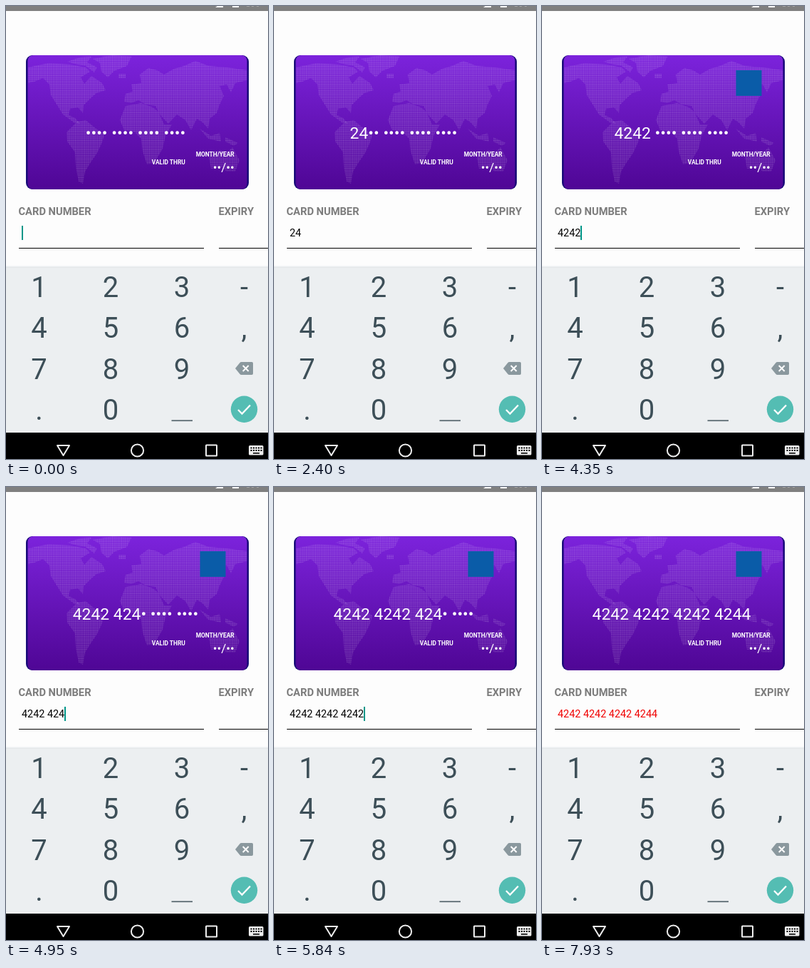
Recreate the animation shown at these times as an HTML page. Size 368 by 635 pixels, loop 8000 ms.

```html
<!DOCTYPE html>
<html lang="en">
<head>
<meta charset="utf-8">
<title>Card number form</title>
<style>
  html, body { margin: 0; width: 100%; height: 100%; overflow: hidden; background: #fdfdfd; }
  svg { display: block; width: 368px; height: 635px; font-family: Roboto, sans-serif; }
  .label { font-size: 14.7px; font-weight: 700; fill: #7c7c7c; }
  .small { font-size: 8.4px; font-weight: 700; fill: #fff; }
  .number { font-size: 22.9px; fill: #fff; text-anchor: middle; }
  .field { font-size: 14.4px; }
  .keys { font-size: 40px; fill: #3d4f58; text-anchor: middle; }
  .nav { fill: none; stroke: #eee; stroke-width: 2; }
</style>
</head>
<body>
<svg viewBox="0 0 368 635">
  <defs>
    <linearGradient id="purple" x2="0" y2="1">
      <stop offset="0" stop-color="#7c23dc"/>
      <stop offset="1" stop-color="#4f0695"/>
    </linearGradient>
    <pattern id="dots" width="2.6" height="2.6" patternUnits="userSpaceOnUse">
      <circle cx="1.3" cy="1.3" r=".95" fill="#fff" fill-opacity=".23"/>
    </pattern>
    <clipPath id="face"><rect x="30.5" y="69" width="308" height="188" rx="8"/></clipPath>
  </defs>

  <!-- status bar -->
  <rect width="368" height="7" fill="#808080"/>
  <path d="M294 2L297 0H305V2ZM318 0H327V2H318Z" fill="#fff"/>
  <path d="M338 .5H342M345 .5H348M352 .5H355" stroke="#a4a4a4"/>

  <!-- card -->
  <rect x="28" y="69" width="313" height="188" rx="9" fill="#180b78"/>
  <g clip-path="url(#face)">
    <rect x="30" y="69" width="309" height="188" fill="url(#purple)"/>
    <g fill="url(#dots)">
      <path d="M31 86L60 80 90 82 112 86 118 92 105 100 110 109 120 98 135 108 140 118 127 122 118 130 109 139 108 150 101 142 90 144 88 153 97 157 104 165 95 163 80 152 70 136 63 125 61 110 52 101 40 106 31 108Z"/>
      <path d="M86 78L104 72 120 71 114 79 128 86 124 93 112 84 96 81Z"/>
      <path d="M122 74L150 69 176 71 170 84 152 91 143 100 134 92 132 80Z"/>
      <path d="M100 162L112 160 124 170 138 180 135 191 128 206 119 219 111 232 108 249 102 246 98 225 97 205 86 190 85 177Z"/>
      <path d="M166 134L168 123 178 120 176 110 190 108 188 96 200 87 212 90 222 96 236 88 250 84 266 77 285 84 310 86 339 90V104L322 108 316 121 310 110 300 112 306 126 300 138 296 150 286 158 284 172 276 163 268 158 260 174 252 160 240 152 228 165 216 152 210 140 196 138 186 132 176 136Z"/>
      <path d="M168 140L190 136 206 142 214 148 222 166 233 166 224 182 220 200 208 220 198 222 192 204 190 186 180 176 166 174 160 160Z"/>
      <path d="M285 212L300 202 312 204 318 198 328 216 322 232 310 232 302 226 288 228ZM272 172L284 186 302 190 300 178 288 182ZM308 184L326 192 320 196 308 190ZM158 95H168V101H158Z"/>
    </g>
  </g>
  <rect id="brand" x="272.5" y="90" width="36" height="36" fill="#0a5ca8"/>
  <text id="number" class="number" x="182" y="185.7"></text>
  <text class="small" x="204.8" y="222">VALID THRU</text>
  <text class="small" x="320.7" y="211" text-anchor="end">MONTH/YEAR</text>
  <text x="320.7" y="231.5" font-size="17" fill="#fff" text-anchor="end">••/••</text>

  <!-- form -->
  <text class="label" x="17.5" y="293.3">CARD NUMBER</text>
  <text class="label" x="298.5" y="293.3">EXPIRY</text>
  <path d="M18 339.5H278M299 339.5H368" stroke="#000"/>
  <text id="field" class="field" x="22" y="323.2"></text>
  <rect id="caret" y="308" width="2" height="20" fill="#009688"/>

  <!-- keyboard -->
  <rect y="364" width="368" height="234" fill="#eceff1"/>
  <path d="M0 364.5H368" stroke="#f4f6f7"/>
  <path d="M0 366.5H368" stroke="#e4e7e9"/>
  <g id="keys" class="keys"></g>
  <path d="M232.5 581.2H262" stroke="#5c6b73" stroke-width="1.8"/>
  <path d="M322 508L328.5 500Q329.3 499 330.5 499H345.3Q347 499 347 500.7V515.3Q347 517 345.3 517H330.5Q329.3 517 328.5 516Z" fill="#8a989e"/>
  <path d="M332.7 504L340.7 512M340.7 504L332.7 512" stroke="#fff" stroke-width="2"/>
  <circle cx="334.5" cy="565.3" r="18.7" fill="#54bdb3"/>
  <path d="M326 566L331.5 571.5 343 559.5" fill="none" stroke="#fff" stroke-width="2.3"/>

  <!-- navigation bar -->
  <rect y="598" width="368" height="37" fill="#000"/>
  <g class="nav">
    <path d="M72 616H89L80.5 630Z" stroke-linejoin="round"/>
    <circle cx="184.5" cy="623" r="8.6"/>
    <rect x="281" y="615.5" width="15" height="15" rx=".5"/>
  </g>
  <rect x="341" y="616" width="20.5" height="13.5" rx="1.5" fill="#eee"/>
  <path d="M343.5 619.5H359.5M343.5 623H359.5" stroke="#000" stroke-width="2" stroke-dasharray="2 1.5"/>
  <path d="M347 626.8H356" stroke="#000" stroke-width="1.6"/>
</svg>
<script>
  const LOOP = 8000;
  const PAN = '4242424242424244';
  const $ = id => document.getElementById(id);
  const pan = n => PAN.slice(0, n);
  const group = s => s.replace(/(.{4})(?=.)/g, '$1 ');

  const columns = [46.5, 147, 247, 334.5];
  ['123-', '456,', '789', '.0'].forEach((row, r) => [...row].forEach((char, c) => {
    const key = document.createElementNS('http://www.w3.org/2000/svg', 'text');
    key.setAttribute('x', columns[c]);
    key.setAttribute('y', 407.7 + r * 57.4);
    key.textContent = char;
    $('keys').append(key);
  }));

  // [start ms, typed digits, caret visible, digits on the card if it lags behind]
  const steps = [
    [0, '', 1], [450, '', 0], [900, '', 1], [1350, '', 0],
    [1500, '2', 1], [1800, '24', 1], [2400, '24', 0], [2550, '2', 1],
    [2850, '', 1], [3300, '', 0],
    [3450, pan(1), 1], [3750, pan(2), 1], [3900, pan(3), 1, pan(2)], [4050, pan(3), 1],
    [4200, pan(4), 1, pan(3)], [4350, pan(4), 1], [4500, pan(5), 1],
    [4650, pan(6), 1, pan(5)], [4800, pan(6), 1], [4950, pan(7), 1],
    [5100, pan(8), 1], [5250, pan(9), 1], [5400, pan(10), 1],
    [5540, pan(11), 1, pan(10)], [5690, pan(11), 1],
    [5840, pan(12), 1, pan(11)], [5990, pan(12), 1],
    [6290, pan(13), 1], [6430, pan(14), 1], [7030, pan(15), 1],
    [7330, PAN, 1], [7930, PAN, 0]
  ];

  // Roboto advance widths in em
  const DIGIT = 0.5615, SPACE = 0.2476, FIELD_SIZE = 14.4;
  const caretX = text => {
    const spaces = text.split(' ').length - 1;
    return Math.round(22 + FIELD_SIZE * ((text.length - spaces) * DIGIT + spaces * SPACE));
  };

  let shown;
  function render(now) {
    const time = now % LOOP;
    const step = steps.findLast(s => s[0] <= time);
    if (step !== shown) {
      shown = step;
      const [, digits, caret, card = digits] = step;
      const text = group(digits);
      $('number').textContent = group(card.padEnd(16, '•'));
      $('field').textContent = text;
      $('field').setAttribute('fill', digits === PAN ? '#f00000' : '#000');
      $('caret').setAttribute('x', caretX(text));
      $('caret').setAttribute('opacity', caret);
      $('brand').setAttribute('opacity', card[0] === '4' ? 1 : 0);
    }
  }

  const origin = performance.now();
  function tick() {
    render(performance.now() - origin);
    requestAnimationFrame(tick);
  }
  tick();
</script>
</body>
</html>
```
